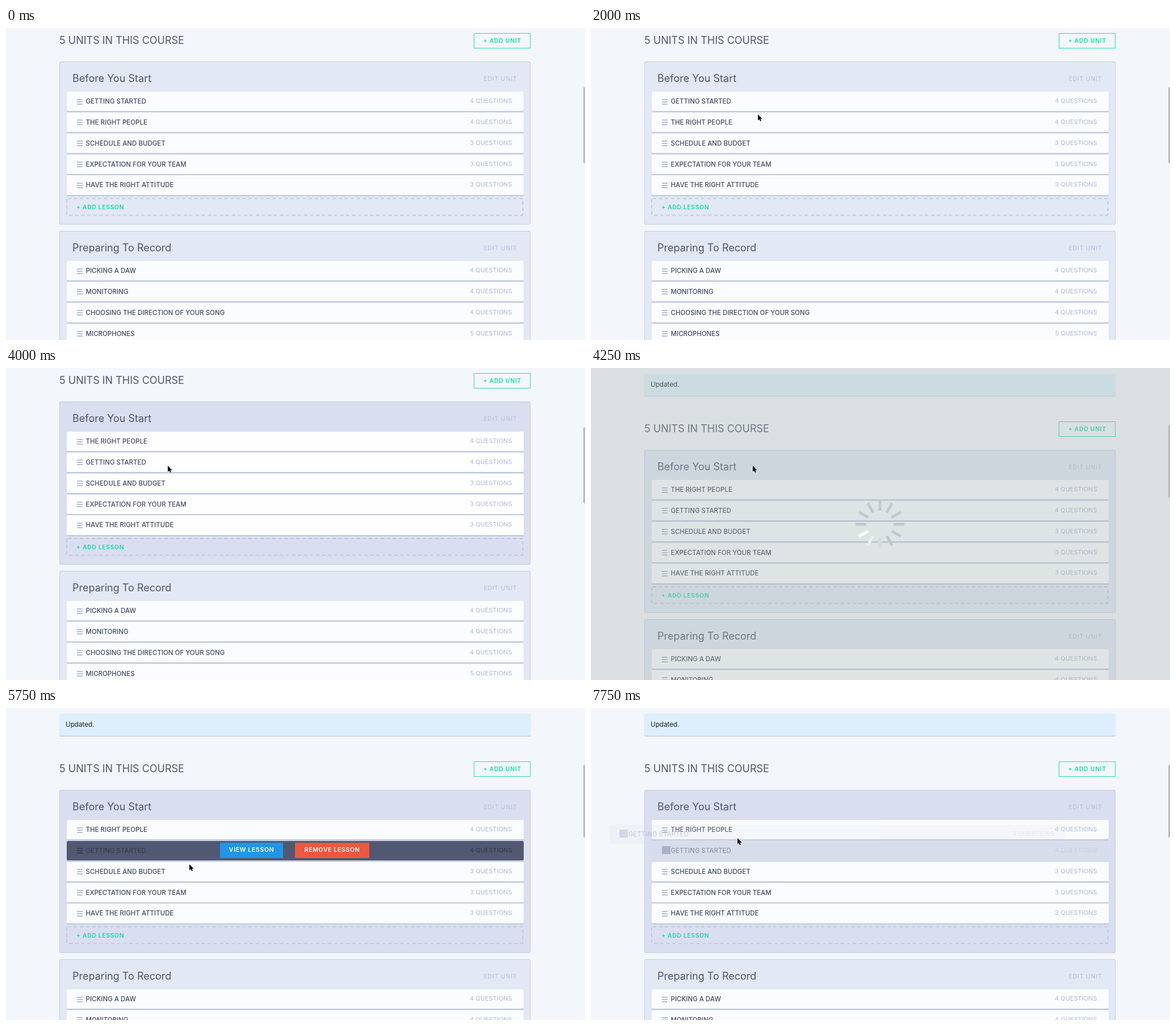
Write an HTML page that moves like this. It is 1020 by 549 pixels and loops after 8000 ms.

```html
<!DOCTYPE html>
<html lang="en">
<head>
<meta charset="utf-8">
<title>Course units</title>
<style>
html, body { margin: 0; width: 100%; height: 100%; overflow: hidden; background: #f3f6fa; }
#stage { position: relative; width: 1020px; height: 549px; overflow: hidden; background: #f3f6fa;
  font-family: Inter, sans-serif; color: #454b66; white-space: nowrap; cursor: default; }
#stage div, #stage svg { position: absolute; box-sizing: border-box; }
#page { left: 0; top: 0; width: 1020px; height: 800px; }
.head { left: 94px; top: 7px; font-size: 18px; line-height: 29px; color: #50566f; }
.btn { font-size: 10.5px; font-weight: 600; letter-spacing: .65px; text-align: center; text-indent: .65px; }
.add-unit { left: 824px; top: 9px; width: 100px; height: 27px; line-height: 26px;
  border: 1px solid #26dfb3; color: #16dda9; }
.alert { left: 94px; top: -75px; width: 830px; height: 39px; padding-left: 11px; border-radius: 2px;
  background: #ddeffc; box-shadow: 0 1px 1px #b5c4d8; font-size: 11.7px; line-height: 38px; color: #1b1e24; }
.unit { left: 94px; width: 830px; height: 287px; border-radius: 3px; background: #e2e8f4;
  box-shadow: inset 0 0 0 1px #c3cde5; }
.title { left: 23px; top: 15px; font-size: 18px; line-height: 30px; color: #50566f; }
.edit { right: 23.5px; top: 20px; font-size: 10.5px; line-height: 21px; font-weight: 500;
  letter-spacing: .8px; color: #b9c4dc; }
.add { left: 30px; top: 246px; font-size: 10.5px; line-height: 21px; font-weight: 600;
  letter-spacing: .6px; color: #16dda9; }
.row { left: 12.5px; width: 805px; height: 34.3px; border-radius: 2px; background: #fafcff;
  box-shadow: 0 2px 1px #bdc8de; }
.label { left: 34px; top: 0; font-size: 11.5px; line-height: 34px; font-weight: 500; }
.count { right: 20px; top: 0; font-size: 11px; line-height: 33px; font-weight: 500; color: #b9c4dc; }
.icon { left: 18.5px; top: 12.5px; width: 10px; height: 10px;
  background: repeating-linear-gradient(#b3c0d8 0 2px, transparent 2px 4px); }
.tools { display: none; left: 0; top: 0; width: 100%; height: 100%; color: #fff; }
.tools .btn { top: 3.5px; height: 26.5px; line-height: 26.5px; }
.view { left: 270px; width: 111.5px; background: #2196e8; }
.remove { left: 402px; width: 131.5px; background: #f0573f; }
.active { background: #d9dff0; }
.bright .row { background: #fefeff; }
#stage .hover { background: #515871; }
.hover .tools { display: block; }
.hover .label, .hover .count { color: #393e52; }
.hover .icon { background: repeating-linear-gradient(#393e52 0 2px, transparent 2px 4px); }
#stage .lifted { background: #d7ddea; box-shadow: none; }
.lifted .label { color: #9298ac; }
.lifted .count { color: #c8cfdf; }
.lifted .icon { top: 9px; width: 15px; height: 14px; background: #a9b3c8; }
#ghost { opacity: .42; background: rgba(215, 221, 234, .45) !important; }
#veil { inset: 0; background: rgba(168, 180, 178, .35); }
#thumb { left: 1017px; width: 4px; border-radius: 2px; background: #b9bbbe; }
</style>
</head>
<body>
<div id="stage">
  <div id="page">
    <div class="alert">Updated.</div>
    <div class="head">5 UNITS IN THIS COURSE</div>
    <div class="btn add-unit">+ ADD UNIT</div>
  </div>
  <div id="veil"></div>
  <svg id="spinner" width="90" height="90" viewBox="-45 -45 90 90" style="left:463.5px;top:230px"></svg>
  <div id="thumb"></div>
  <svg id="cursor" width="12" height="16" viewBox="-1 -1 12 16">
    <path d="M0 0V10.6L2.5 8.5 4.1 12 5.9 11.2 4.3 7.8H7.6Z" fill="#000" stroke="#fff" stroke-width=".8" paint-order="stroke"/>
  </svg>
</div>
<script>
const LOOP = 8000, TICK = 250, PITCH = 36.85, ROW_TOP = 53, SHIFT = 85;
const $ = id => document.getElementById(id);
const page = $('page');

function add(parent, cls, text = '') {
  const el = document.createElement('div');
  el.className = cls;
  el.textContent = text;
  parent.append(el);
  return el;
}

function makeRow(parent, name, count) {
  const row = add(parent, 'row');
  add(row, 'icon');
  add(row, 'label', name);
  add(row, 'count', count + ' QUESTIONS');
  const tools = add(row, 'tools');
  add(tools, 'btn view', 'VIEW LESSON');
  add(tools, 'btn remove', 'REMOVE LESSON');
  return row;
}

const slot = i => ROW_TOP + i * PITCH + 'px';

function makeUnit(top, title, lessons) {
  const unit = add(page, 'unit');
  unit.style.top = top + 'px';
  add(unit, 'title', title);
  add(unit, 'edit', 'EDIT UNIT');
  const rows = lessons.map(([name, count], i) => {
    const row = makeRow(unit, name, count);
    row.style.top = slot(i);
    return row;
  });
  unit.insertAdjacentHTML('beforeend', `<svg width="806" height="32" style="left:12px;top:240px">
    <rect x="1" y="1" width="803.5" height="29.5" rx="2" fill="none" stroke="#b9c4da"
      stroke-width="1.6" stroke-dasharray="6 4.6"/></svg>`);
  add(unit, 'add', '+ ADD LESSON');
  return { unit, rows };
}

const { unit, rows } = makeUnit(59, 'Before You Start', [
  ['GETTING STARTED', 4], ['THE RIGHT PEOPLE', 4], ['SCHEDULE AND BUDGET', 3],
  ['EXPECTATION FOR YOUR TEAM', 3], ['HAVE THE RIGHT ATTITUDE', 3]]);
makeUnit(357, 'Preparing To Record', [
  ['PICKING A DAW', 4], ['MONITORING', 4],
  ['CHOOSING THE DIRECTION OF YOUR SONG', 4], ['MICROPHONES', 5]]);

const ghost = makeRow($('stage'), 'GETTING STARTED', 4);
ghost.id = 'ghost';
ghost.classList.add('lifted');
$('stage').insertBefore(ghost, $('veil'));

const spokes = Array.from({ length: 12 }, (_, i) => {
  const line = document.createElementNS('http://www.w3.org/2000/svg', 'path');
  line.setAttribute('d', 'M0-24V-43');
  line.setAttribute('stroke-width', 5);
  line.setAttribute('transform', `rotate(${i * 30})`);
  $('spinner').append(line);
  return line;
});
const tail = ['#fff', '#e9eeef', '#d5dcdf', '#bfc7cb'];

// Pointer: time, x, y; each place holds until the next.
const path = [
  [500, 874, 528], [750, 640, 330], [1000, 420, 140], [1250, 300, 43], [1500, 280, 85],
  [1750, 270, 114], [2000, 294, 152], [2250, 272, 142], [2500, 258, 135],
  [3250, 263, 142], [3500, 274, 154], [3750, 286, 169], [4000, 285, 172],
  [5250, 300, 255], [5750, 323, 275], [6000, 332, 286], [6250, 336, 281],
  [6500, 336, 266], [6750, 333, 258], [7500, 295, 243], [7750, 258, 229]];

const drags = [
  { from: 3000, to: 4000, x: 258, y: 135, top: 112 },
  { from: 7250, to: LOOP, x: 333, y: 258, top: 59 + SHIFT + ROW_TOP + PITCH }];

function render(t) {
  const within = (a, b) => t >= a && t < b;
  const reloaded = t >= 4250, loading = within(4250, 5250);
  const swapped = t >= 3500;
  const drag = drags.find(d => within(d.from, d.to));
  const spot = path.filter(p => p[0] <= t).pop();

  page.style.top = (reloaded ? SHIFT : 0) + 'px';
  $('thumb').style.top = (reloaded ? 100 : 104) + 'px';
  $('thumb').style.height = (reloaded ? 128 : 134) + 'px';

  unit.classList.toggle('active', t >= 2250 && !loading);
  unit.classList.toggle('bright', within(2250, 4250));
  rows[0].style.top = slot(swapped ? 1 : 0);
  rows[1].style.top = slot(swapped ? 0 : 1);

  const onThird = within(6000, 6500);
  const onFirst = within(2250, 3000) || (within(5250, 7250) && !onThird);
  rows[0].classList.toggle('hover', onFirst);
  rows[2].classList.toggle('hover', onThird);
  rows[0].classList.toggle('lifted', !!drag);

  const moved = drag && t >= drag.from + TICK;
  ghost.style.display = moved ? 'block' : 'none';
  if (moved) {
    ghost.style.left = 106.5 + spot[1] - drag.x + 'px';
    ghost.style.top = drag.top + spot[2] - drag.y + 'px';
  }

  $('veil').style.display = $('spinner').style.display = loading ? 'block' : 'none';
  const lead = 8 + (t - 4250) / TICK * 3;
  if (loading) spokes.forEach((s, i) =>
    s.setAttribute('stroke', tail[(lead - i + 24) % 12] || '#c2cace'));

  $('cursor').style.display = spot ? 'block' : 'none';
  if (spot) {
    $('cursor').style.left = spot[1] - 1 + 'px';
    $('cursor').style.top = spot[2] - 1 + 'px';
  }
}

function loop() {
  const t = performance.now() % LOOP;
  render(t - t % TICK);
  requestAnimationFrame(loop);
}
loop();
</script>
</body>
</html>
```
